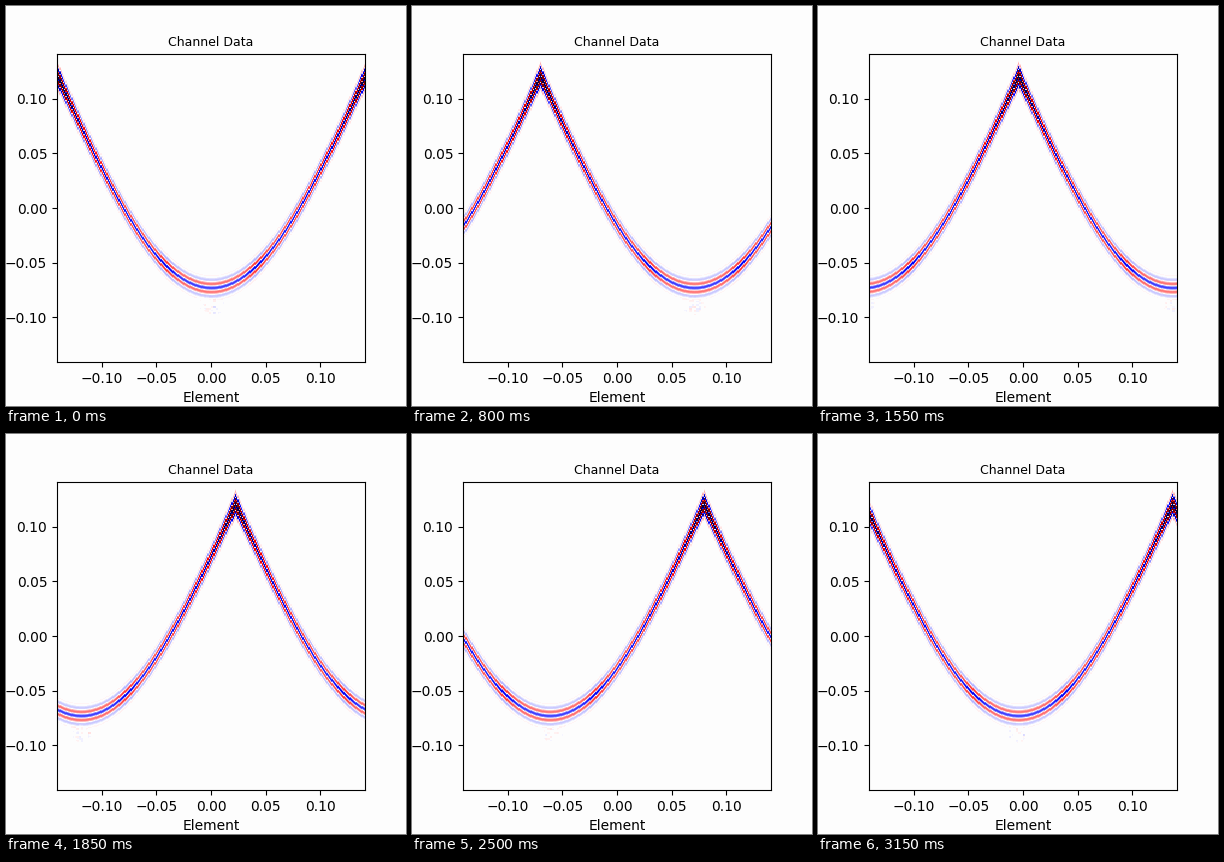
These frames come from a looping animation (400x400 px, 3200 ms). A matplotlib script:

```python
import numpy as np
import matplotlib.pyplot as plt
from matplotlib.animation import FuncAnimation

FRAMES = 64
ELEMENTS = 256
ROWS = 308
EXTENT = 0.141
PAPER = "#fdfdfd"

# Vertical sizes below are in rows of the image
START = 22.0      # arrival at the transmitting element
DIAMETER = 212.0  # travel across the whole ring
PERIOD = 8.6
WIDTH = 5.2

rows = np.arange(ROWS)[:, None] + 0.5
ring = 2 * np.pi * np.arange(ELEMENTS) / ELEMENTS


def bump(x, centre, width):
    return np.exp(-0.5 * ((x - centre) / width) ** 2)


def channel_data(shot):
    """Pulses received around the ring for one transmitting element."""
    turn = (ring - 2 * np.pi * shot / FRAMES) % (2 * np.pi)
    path = DIAMETER * np.sin(turn / 2)
    across = turn - np.pi

    # Spreading loss, with focusing at the rim of the object inside the ring
    gain = 0.41 * np.sqrt(DIAMETER / np.maximum(path, 4))
    gain *= 1 + 0.3 * bump(np.abs(across), 0.93, 0.13) - 0.08 * bump(across, 0, 0.5)

    late = rows - START - path
    data = -gain * bump(late, 0, WIDTH) * np.cos(2 * np.pi * late / PERIOD)

    # Weak scattering behind the main arrival
    rng = np.random.default_rng(shot)
    grain = rng.normal(size=(ROWS // 2, ELEMENTS // 2))
    grain = grain.repeat(2, axis=0).repeat(2, axis=1)
    data += 0.025 * grain * bump(across, 0, 0.18) * bump(late, 19, 6)

    data[np.abs(data) < 0.02] = np.nan
    return data


fig, ax = plt.subplots(figsize=(4, 4), dpi=100, facecolor=PAPER)
ax.set_facecolor(PAPER)
image = ax.imshow(channel_data(0), cmap="seismic", vmin=-1, vmax=1,
                  extent=[-EXTENT, EXTENT, -EXTENT, EXTENT],
                  interpolation="nearest")
ax.set_title("Channel Data", fontsize=9)
ax.set_xlabel("Element")


def update(shot):
    image.set_data(channel_data(shot))
    return [image]


anim = FuncAnimation(fig, update, frames=FRAMES, interval=50, repeat=True)
plt.show()
```
